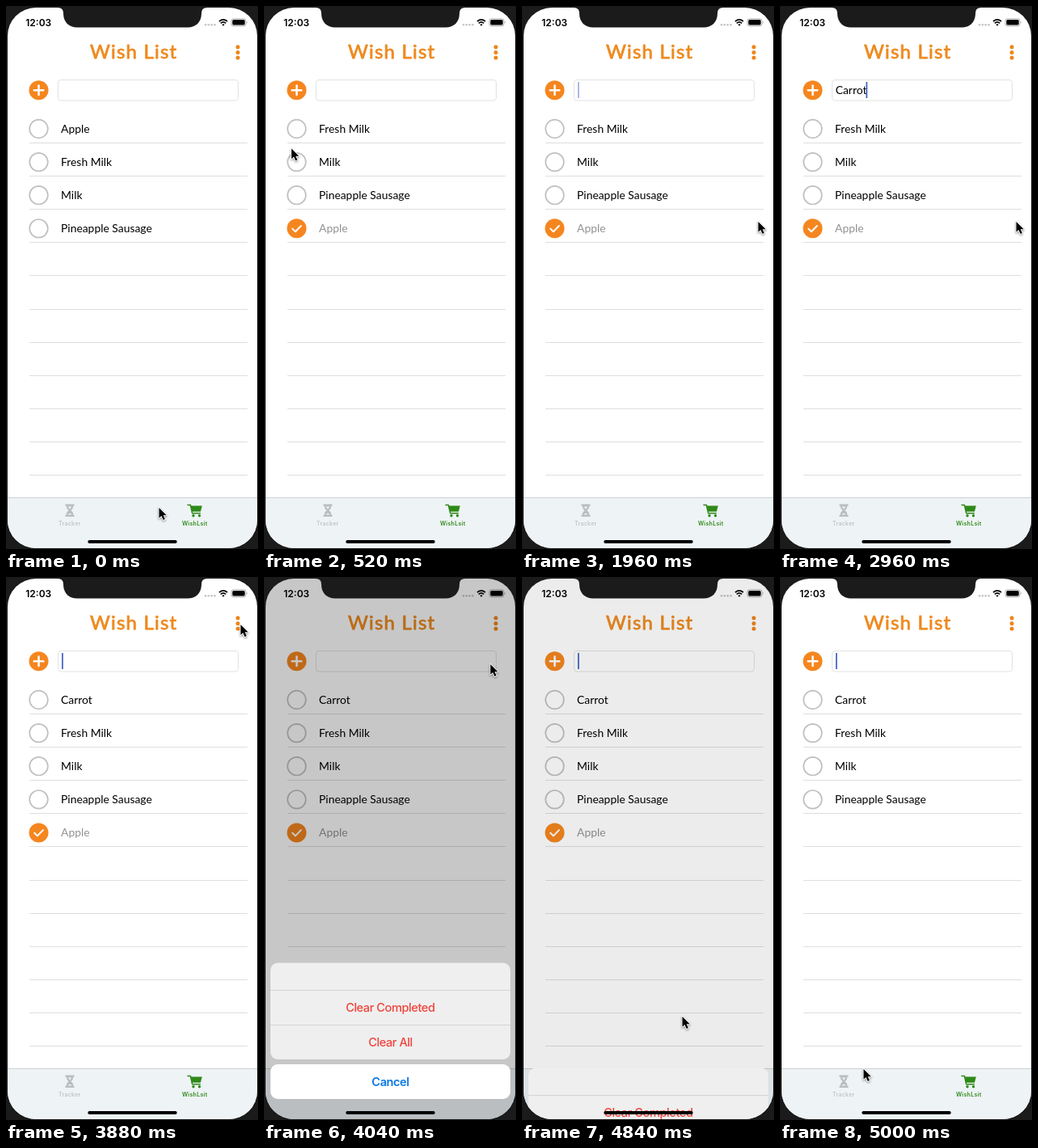
Write an HTML page that moves like this. It is 312 px wide and 672 px high and loops after 5040 ms.

```html
<!DOCTYPE html>
<html lang="en">
<head>
<meta charset="utf-8">
<title>Wish List</title>
<style>
  html, body { margin: 0; width: 100%; height: 100%; overflow: hidden; background: #1b1b1b; }
  svg { display: block; width: 312px; height: 672px; }
  text { white-space: pre; }
  .title { font: 400 24px Lato, "Open Sans", sans-serif; letter-spacing: 1.2px; fill: #ee8a1f; stroke: #ee8a1f; stroke-width: .8; stroke-linejoin: round; }
  .item { font: 400 13.9px Lato, "Open Sans", sans-serif; }
  .clock { font: 600 12px Inter, Roboto, sans-serif; }
  .tab { font: 500 7px Inter, Roboto, sans-serif; letter-spacing: .3px; text-anchor: middle; }
  .active { font-weight: 600; }
  .action { font: 450 14.6px Inter, Roboto, sans-serif; letter-spacing: -.45px; text-anchor: middle; fill: #f0433b; }
  .cancel { font-weight: 600; fill: #0b78e3; }
  .round { fill: none; stroke-linecap: round; stroke-linejoin: round; }
  #cursor { filter: drop-shadow(0 1px .8px rgba(0, 0, 0, .45)); }
</style>
</head>
<body>
<svg viewBox="0 0 312 672" xmlns="http://www.w3.org/2000/svg">
  <defs>
    <clipPath id="screen"><rect x="2" y="2" width="309" height="669" rx="35"/></clipPath>
  </defs>
  <rect width="312" height="672" fill="#1b1b1b"/>
  <g clip-path="url(#screen)">
    <rect width="312" height="672" fill="#fff"/>
    <text class="title" x="104" y="65.3">Wish List</text>
    <g id="menuDots" fill="#f08519"></g>
    <circle cx="40.5" cy="104.2" r="12" fill="#f5861f"/>
    <path class="round" d="M34.7 104.2h11.6M40.5 98.4v11.6" stroke="#fff" stroke-width="2.5"/>
    <rect x="64.5" y="91.5" width="223" height="25.500" rx="3.5" fill="#fff" stroke="#e2e2e2"/>
    <text class="item" id="entry" x="68.7" y="108.7"></text>
    <rect id="caret" y="94" width="1.8" height="20" fill="#4668c5"/>
    <g id="lines" stroke="#dedede"></g>
    <g id="list"></g>

    <rect y="608.5" width="312" height="64" fill="#eef3f6"/>
    <path d="M0 608.5h312" stroke="#cdd2d6"/>
    <g fill="#bbbec1">
      <path d="M73.500 616.500h11v2.300h-1.200q0 3.500-2.800 5.500 2.800 2 2.800 5.400h1.200v2.300h-11v-2.300h1.200q0-3.400 2.800-5.400-2.800-2-2.800-5.500h-1.200z"/>
      <path d="M76.700 619.600h4.600l-2.300 3.200zM76.500 629.500q2.500-3.500 5 0z" fill="#eef3f6"/>
      <text class="tab" x="78.8" y="642.7">Tracker</text>
    </g>
    <g fill="#2f8a18">
      <path class="round" d="M225 617.500h3.300l2.300 10.200h9.700" stroke="#2f8a18" stroke-width="1.5"/>
      <path d="M228.500 618.500h14.300l-1.900 7.300h-10.700z"/>
      <circle cx="232" cy="630.7" r="1.7"/><circle cx="239.5" cy="630.7" r="1.7"/>
      <text class="tab active" x="233.7" y="642.7">WishLsit</text>
    </g>

    <text class="clock" x="24.3" y="24.8">12:03</text>
    <g id="signalDots" fill="#c4c4c4"></g>
    <path d="M264 19q5-4.400 10 0M265.800 21.300q3.200-2.700 6.400 0" fill="none" stroke="#000" stroke-width="1.7"/>
    <path d="M267.400 23q1.600-1.300 3.200 0l-1.600 1.800z"/>
    <rect x="279" y="15.8" width="18" height="9" rx="2.6" fill="none" stroke="#999" stroke-width=".8"/>
    <rect x="280.3" y="17.1" width="15.4" height="6.4" rx="1.5"/>
    <path d="M298.200 18.800q1.500 1.500 0 3z" fill="#999"/>

    <rect id="dim" width="312" height="672"/>
    <g id="sheet">
      <rect x="8" y="477.5" width="297" height="119.5" rx="9" fill="#efefef"/>
      <path d="M8 511.500h297M8 554.500h297" stroke="#d2d3d3"/>
      <text class="action" x="156.3" y="538">Clear Completed</text>
      <text class="action" x="156.5" y="581">Clear All</text>
      <rect x="8" y="603" width="297" height="43" rx="9" fill="#fff"/>
      <text class="action cancel" x="156.5" y="629.5">Cancel</text>
    </g>
    <rect x="101.3" y="661" width="110.4" height="4" rx="2"/>
  </g>
  <path d="M64 0v2q7 0 7 7c0 11 7 17.500 17 17.500h137c10 0 17-6.500 17-17.500q0-7 7-7v-2z" fill="#1b1b1b"/>
  <path id="cursor" d="M.5 1v12.800l2.900-2.700 2.300 5 2.200-1-2.200-4.800h4.100z" stroke="#fff" stroke-width="1.8" stroke-linejoin="round" paint-order="stroke"/>
</svg>
<script>
const LOOP = 5040, STEP = 40, ROW = 41.1;
const CHECK = 480, FOCUS = 1280, TYPE = 2000, KEY_GAP = 112, ADD = 3400, MENU = 3880, DISMISS = 4760, REMOVE = 4920;

const el = id => document.getElementById(id);
const ramp = (t, from, to) => Math.max(0, Math.min(1, (t - from) / (to - from)));
const ease = k => k ** 3 * (k * (6 * k - 15) + 10);
const repeat = (count, draw) => Array.from({ length: count }, (_, i) => draw(i)).join('');

// Where the pointer comes to rest
const stops = [
  { t: 0, x: 189, y: 620 },
  { t: CHECK - STEP, x: 40, y: 152 },
  { t: 600, x: 27, y: 199 },
  { t: 1040, x: 47, y: 104 },
  { t: FOCUS, x: 75, y: 103 },
  { t: 1640, x: 292, y: 266 },
  { t: 2960, x: 292, y: 266 },
  { t: 3280, x: 8, y: 88 },
  { t: ADD, x: 40, y: 104 },
  { t: MENU, x: 290, y: 58 },
  { t: 4520, x: 192, y: 531 },
  { t: 4840, x: 198, y: 543 },
  { t: 5000, x: 103, y: 608 }
];

function pointerAt(t) {
  const next = stops.findIndex(stop => stop.t > t);
  if (next < 0) return stops.at(-1);
  const a = stops[next - 1], b = stops[next];
  const k = ease(ramp(t, a.t, b.t));
  return { x: a.x + (b.x - a.x) * k, y: a.y + (b.y - a.y) * k };
}

function row(name, index, done) {
  const y = 152 + index * ROW;
  const mark = done
    ? `<circle cx="40.5" cy="${y}" r="12" fill="#f5861f"/>
       <path class="round" d="M35.2 ${y + .3}l3.7 3.7 7-7.3" stroke="#fff" stroke-width="2"/>`
    : `<circle cx="40.5" cy="${y}" r="11.3" fill="none" stroke="#c0c0c0" stroke-width="1.7"/>`;
  return `${mark}<text class="item" x="68" y="${y + 4.5}" fill="${done ? '#929292' : '#000'}">${name}</text>`;
}

function itemsAt(t) {
  const items = ['Fresh Milk', 'Milk', 'Pineapple Sausage'];
  if (t < CHECK) return ['Apple', ...items];
  if (t >= ADD) items.unshift('Carrot');
  if (t < REMOVE) items.push('Apple');
  return items;
}

function typedAt(t) {
  const count = Math.floor((t - TYPE) / KEY_GAP) + 1;
  return t < ADD ? 'Carrot'.slice(0, Math.max(0, count)) : '';
}

function caretOpacity(t) {
  if (t < FOCUS || (t > MENU && t < DISMISS + STEP)) return 0;
  const blink = (off, on) => 1 - ramp(t, off, off + 80) + ramp(t, on, on + 80);
  if (t < TYPE + 6 * KEY_GAP) return blink(1680, 1920);
  return t < ADD ? blink(3040, 3240) : 1;
}

function render(t) {
  el('list').innerHTML = itemsAt(t)
    .map((name, i) => row(name, i, name === 'Apple' && t >= CHECK)).join('');

  const typed = typedAt(t);
  el('entry').textContent = typed;
  el('caret').setAttribute('x', typed ? 67.7 + el('entry').getComputedTextLength() : 69);
  el('caret').setAttribute('opacity', caretOpacity(t));

  const shown = t < DISMISS
    ? 1 - (1 - ramp(t, MENU, MENU + 160)) ** 2
    : 1 - ramp(t, DISMISS, DISMISS + 120);
  el('sheet').setAttribute('transform', `translate(0 ${195 * (1 - shown)})`);
  el('dim').setAttribute('opacity', .22 * shown);

  const { x, y } = pointerAt(t);
  el('cursor').setAttribute('transform', `translate(${x} ${y})`);
}

el('lines').innerHTML = repeat(11, i => `<path d="M29 ${Math.round(169 + i * ROW) + .5}h270"/>`);
el('menuDots').innerHTML = repeat(3, i => `<circle cx="287" cy="${50.8 + i * 6.6}" r="2.5"/>`);
el('signalDots').innerHTML = repeat(4, i => `<circle cx="${247 + i * 3.8}" cy="23.3" r="1.3"/>`);

const start = performance.now();
function tick() {
  const elapsed = (performance.now() - start) % LOOP;
  render(Math.floor(elapsed / STEP) * STEP);
  requestAnimationFrame(tick);
}
tick();
</script>
</body>
</html>
```
